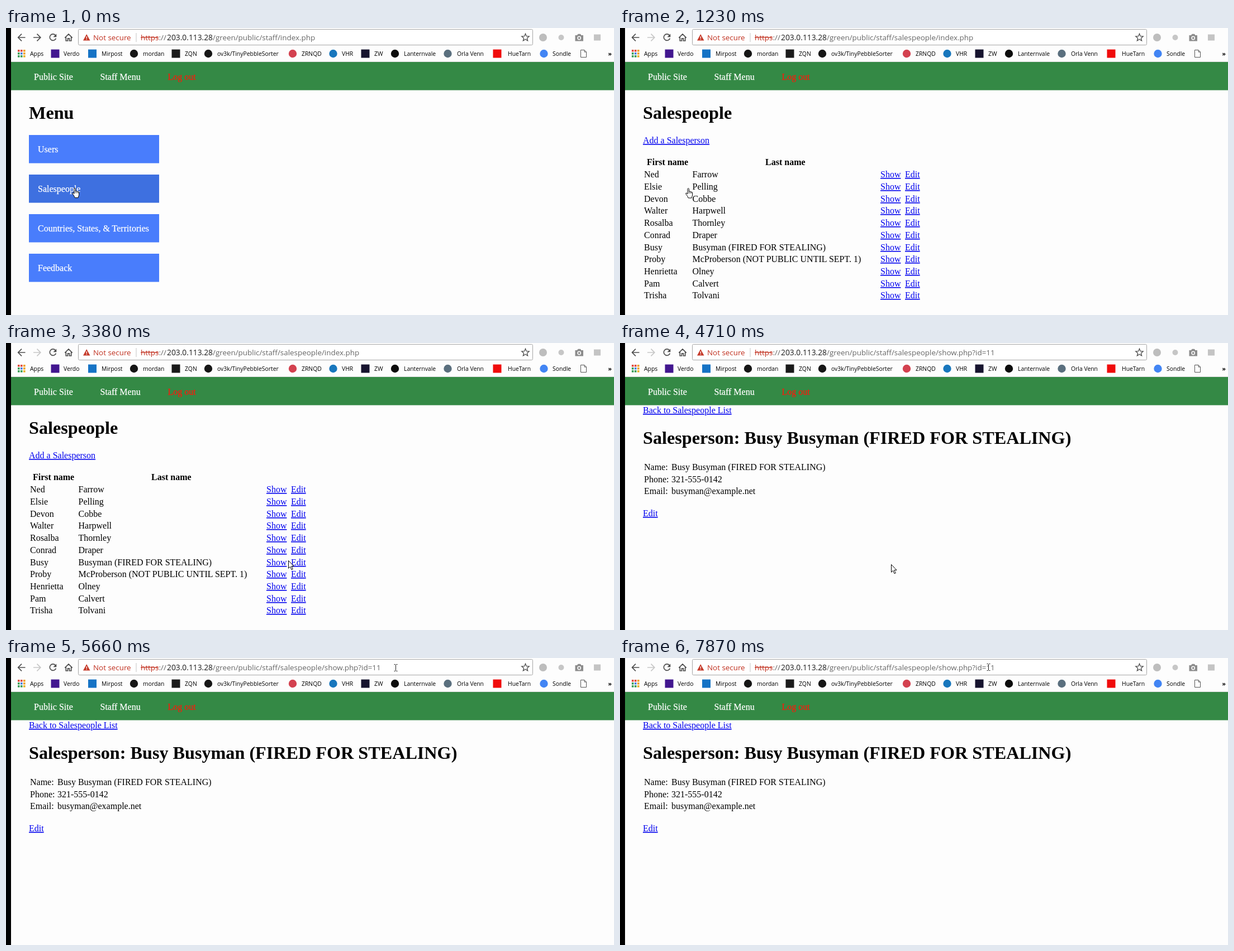
Write an HTML page that moves like this. It is 1088 px wide and 515 px high and loops after 7.99 s.

```html
<!DOCTYPE html>
<html lang="en">
<head>
<meta charset="utf-8">
<title>Staff pages</title>
<style>
html, body { margin: 0; width: 100%; height: 100%; overflow: hidden; background: #fdfdfd; }
svg { display: block; width: 1088px; height: 515px; }
text { font: 16px "Liberation Serif", "Times New Roman", serif; fill: #000; }
.bar { font: 13.4px "Open Sans", "Noto Sans", sans-serif; fill: #666; }
.warn { fill: #c0301f; }
.host { font-size: 13.8px; fill: #1c1c1c; }
.mark { font: 10.4px "Open Sans", "Noto Sans", sans-serif; fill: #000; }
.h1 { font-size: 32.2px; font-weight: bold; }
.bold { font-weight: bold; }
.white { fill: #fff; stroke: #fff; stroke-width: .25; }
.red { fill: #fb1a0c; stroke: #fb1a0c; stroke-width: .25; }
.link { fill: #00e; text-decoration: underline; }
.line { fill: none; stroke: #4d4d4d; stroke-width: 1.7; }
</style>
</head>
<body>
<svg id="stage" viewBox="0 0 1088 515"></svg>
<script>
const LOOP = 7990;

const text = (x, y, str, cls = '') =>
  `<text x="${x}" y="${y}" class="${cls}">${str.replace(/&/g, '&amp;')}</text>`;
const rect = (x, y, w, h, fill, extra = '') =>
  `<rect x="${x}" y="${y}" width="${w}" height="${h}" fill="${fill}" ${extra}/>`;
const dot = (x, y, r, fill) => `<circle cx="${x}" cy="${y}" r="${r}" fill="${fill}"/>`;
const path = (d, attrs = 'class="line"') => `<path d="${d}" ${attrs}/>`;
const group = (id, body) => `<g id="${id}">${body}</g>`;

// Browser toolbar
function toolbar() {
  const star = Array.from({ length: 10 }, (_, i) => {
    const a = i * Math.PI / 5 - Math.PI / 2, r = i % 2 ? 3.1 : 7;
    return `${(929.5 + r * Math.cos(a)).toFixed(1)} ${(17.2 + r * Math.sin(a)).toFixed(1)}`;
  }).join('L');
  return path('M34.5 17H22M28 10.7L21.7 17L28 23.3') +
    group('forward', path('M49 17H61.5M55.5 10.7L61.8 17L55.5 23.3')) +
    group('reload', path('M88.4 13A5.7 5.7 0 1 0 89.4 18.6') +
      path('M90.3 10.4V16.2H84.5Z', 'fill="#4d4d4d"')) +
    group('stop', path('M78.7 11.7L89.3 22.3M89.3 11.7L78.7 22.3')) +
    path('M105.3 17.6L112 11L118.7 17.6M107.3 16.5V23H110.5V18.8H113.5V23H116.7V16.5') +
    rect(129.5, 2.5, 813, 28, '#fff', 'rx="2" stroke="#a6a6a6"') +
    path('M144.2 11L150.5 22.5H138Z', 'fill="#c53929"') +
    rect(143.6, 15, 1.3, 3.8, '#fff') + rect(143.6, 19.8, 1.3, 1.3, '#fff') +
    text(156, 21.5, 'Not secure', 'bar warn') +
    rect(232.5, 9, 1, 16, '#c4c4c4') +
    text(241, 21.5, 'https', 'bar warn') + rect(241, 16.5, 32, 1.2, '#c53929') +
    text(273.5, 21.5, '://', 'bar') +
    text(288, 21.5, '203.0.113.28', 'bar host') +
    `<text id="url" x="370" y="21.5" class="bar"></text>` +
    path(`M${star}Z`, 'fill="none" stroke="#4d4d4d" stroke-width="1.3"') +
    dot(961, 17, 7, '#bdbdbd') + dot(993.5, 17, 5, '#c6c6c6') +
    path('M1018.5 13H1022L1023.5 10.7H1028L1029.5 13H1033V23.5H1018.5Z', 'fill="#8c8c8c"') +
    dot(1025.7, 18, 3.4, '#fff') + dot(1025.7, 18, 1.9, '#8c8c8c') +
    rect(1052, 11.5, 12, 11, '#c4c4c4');
}

// Bookmark row: label, label x, icon centre, colour, round icon
const marks = [
  ['Verdo', 103, 88, '#42168f', 0],
  ['Mirpost', 171, 154.5, '#1673c5', 0],
  ['mordan', 245, 229, '#161616', 1],
  ['ZQN', 320, 304, '#1a1a1a', 0],
  ['ov3k/TinyPebbleSorter', 378, 362, '#161616', 1],
  ['ZRNQD', 529, 513, '#d3414f', 1],
  ['VHR', 601, 585.5, '#1877bd', 1],
  ['ZW', 659, 643, '#17142f', 0],
  ['Lanternvale', 712, 696, '#0c0c0c', 1],
  ['Orla Venn', 807, 790.5, '#5a6f7e', 1],
  ['HueTarn', 898, 879, '#f00b0b', 0],
  ['Sondle', 978, 962.5, '#4285f4', 1]
];

function bookmarks() {
  const tints = ['#e2493b', '#e2493b', '#f0a020', '#3b9e57', '#4580e8', '#f0a020', '#3b9e57', '#3b9e57', '#e9b32d'];
  const apps = tints.map((c, i) => rect(21 + i % 3 * 5, 39 + Math.floor(i / 3) * 5, 3.6, 3.6, c)).join('');
  const items = marks.map(([name, x, cx, color, round]) =>
    (round ? dot(cx, 46, 7.2, color) : rect(cx - 7.5, 38.5, 15, 15, color)) +
    text(x, 50, name, 'mark')).join('');
  return apps + text(43, 50, 'Apps', 'mark') + items +
    path('M1028.5 39.5H1035L1038.5 43V52.5H1028.5ZM1035 39.5V43H1038.5', 'fill="#fff" stroke="#555"') +
    text(1077.5, 49.5, '»', 'mark bold');
}

const nav = () => rect(9, 60, 1079, 1, '#ddd') + rect(9, 61, 1079, 50.6, '#348945') +
  text(50, 93, 'Public Site', 'white') + text(168.5, 93, 'Staff Menu', 'white') +
  text(289.5, 93, 'Log out', 'red');

// The three pages
function menuPage() {
  const items = ['Users', 'Salespeople', 'Countries, States, & Territories', 'Feedback'];
  return text(41, 163, 'Menu', 'h1') + items.map((name, i) => {
    const y = Math.round(192.3 + i * 70.9);
    return rect(41, y, 233, 50.6, i === 1 ? '#3e70e0' : '#497dfc') + text(57, y + 31, name, 'white');
  }).join('');
}

const people = [
  'Ned Farrow', 'Elsie Pelling', 'Devon Cobbe', 'Walter Harpwell', 'Rosalba Thornley', 'Conrad Draper',
  'Busy Busyman (FIRED FOR STEALING)', 'Proby McProberson (NOT PUBLIC UNTIL SEPT. 1)',
  'Henrietta Olney', 'Pam Calvert', 'Trisha Tolvani'
];

function listPage() {
  const rows = people.map((name, i) => {
    const y = Math.round(268.2 + i * 21.72), gap = name.indexOf(' ');
    return text(43, y, name.slice(0, gap)) + text(129.5, y, name.slice(gap + 1)) +
      text(466, y, 'Show', 'link') + text(510, y, 'Edit', 'link');
  }).join('');
  return text(41, 163, 'Salespeople', 'h1') + text(41, 207, 'Add a Salesperson', 'link') +
    text(48, 246, 'First name', 'bold') + text(260, 246, 'Last name', 'bold') + rows;
}

function detailPage() {
  const rows = [['Name:', people[6]], ['Phone:', '321-555-0142'], ['Email:', 'busyman@example.net']];
  return text(41, 126, 'Back to Salespeople List', 'link') +
    text(41, 181, 'Salesperson: ' + people[6], 'h1') +
    rows.map(([k, v], i) => {
      const y = Math.round(228 + i * 21.72);
      return text(43, y, k) + text(92, y, v);
    }).join('') + text(41, 311, 'Edit', 'link');
}

// Cursors: arrow and hand are placed by tip, beam by centre
const outline = 'fill="#fff" stroke="#000" stroke-linejoin="round"';
const cursors = {
  arrow: path('M.5.5V14.3L3.7 11.3L6 16.8L8.2 15.8L5.9 10.5H10Z', outline),
  hand: path('M0 2.2Q1.2 -.6 2.4 2.2V7Q3.8 5.8 4.7 7.3Q5.9 6.4 6.9 8Q8.3 7.4 8.6 9.2V13.5L7.2 18.5H1.2L-.4 15L-3.2 11.3Q-3.6 9.3 -2 9.6L0 11.3Z', outline) +
    path('M2.4 7V10.5M4.7 7.3V10.5M6.9 8V10.5', 'fill="none" stroke="#000" stroke-width=".7"'),
  beam: path('M-3 -6H-1L0 -5L1 -6H3M0 -5V5M-3 6H-1L0 5L1 6H3',
    'transform="translate(.5 .5)" fill="none" stroke="#222"')
};

// Pointer track: time, shape, x, y
const track = [
  [0, 'hand', 122, 286], [300, 'arrow', 121, 287], [1230, 'hand', 121, 286.5],
  [1760, 'arrow', 121, 287], [1890, 'arrow', 121, 316], [2040, 'arrow', 136, 341],
  [2160, 'arrow', 142, 361], [2300, 'arrow', 129, 380], [2430, 'arrow', 126, 398],
  [2550, 'arrow', 132, 411], [2670, 'arrow', 149, 403], [2790, 'arrow', 164, 392],
  [2940, 'arrow', 221, 401], [3100, 'arrow', 376, 375], [3380, 'arrow', 505, 390],
  [3530, 'hand', 508, 391], [3670, 'hand', 495, 396], [3820, 'hand', 485, 396.5],
  [4250, 'arrow', 485, 397], [4830, 'hand', 485, 396.5], [5390, 'arrow', 552, 196],
  [5540, 'arrow', 632, 98], [5660, 'beam', 697, 17], [5930, 'beam', 710, 8],
  [6050, 'beam', 705, 7], [6170, 'beam', 697, 9], [6630, 'beam', 692, 9],
  [6750, 'beam', 682, 14], [6870, 'beam', 669, 17], [6990, 'beam', 657, 17],
  [7110, 'beam', 649, 17], [7390, 'beam', 657, 17], [7510, 'beam', 669, 17],
  [7630, 'beam', 677, 17], [7750, 'beam', 668, 17], [7870, 'beam', 659, 16]
];

const pages = [
  { at: 0, id: 'menu', url: 'index.php' },
  { at: 1230, id: 'list', url: 'salespeople/index.php' },
  { at: 4710, id: 'detail', url: 'salespeople/show.php?id=11' }
];

const byId = id => document.getElementById(id);
byId('stage').innerHTML = rect(0, 0, 1088, 515, '#fdfdfd') +
  toolbar() + bookmarks() + nav() +
  group('menu', menuPage()) + group('list', listPage()) + group('detail', detailPage()) +
  rect(0, 0, 9, 515, '#000') +
  Object.keys(cursors).map(k => group(k, cursors[k])).join('');

const show = (id, on) => { byId(id).style.display = on ? '' : 'none'; };
const latest = (list, test) => list.filter(test).pop();

function draw() {
  const t = performance.now() % LOOP;
  const page = latest(pages, p => p.at <= t);
  const [, shape, x, y] = latest(track, k => k[0] <= t);
  const loading = t >= 300 && t < 1230 || t >= 4250 && t < 4710;

  pages.forEach(p => show(p.id, p === page));
  byId('url').textContent = '/green/public/staff/' + page.url;
  byId('forward').style.opacity = page.id === 'menu' ? 1 : 0.3;
  show('reload', !loading);
  show('stop', loading);
  Object.keys(cursors).forEach(k => show(k, k === shape));
  byId(shape).setAttribute('transform', `translate(${x} ${y})`);
  requestAnimationFrame(draw);
}
draw();
</script>
</body>
</html>
```
